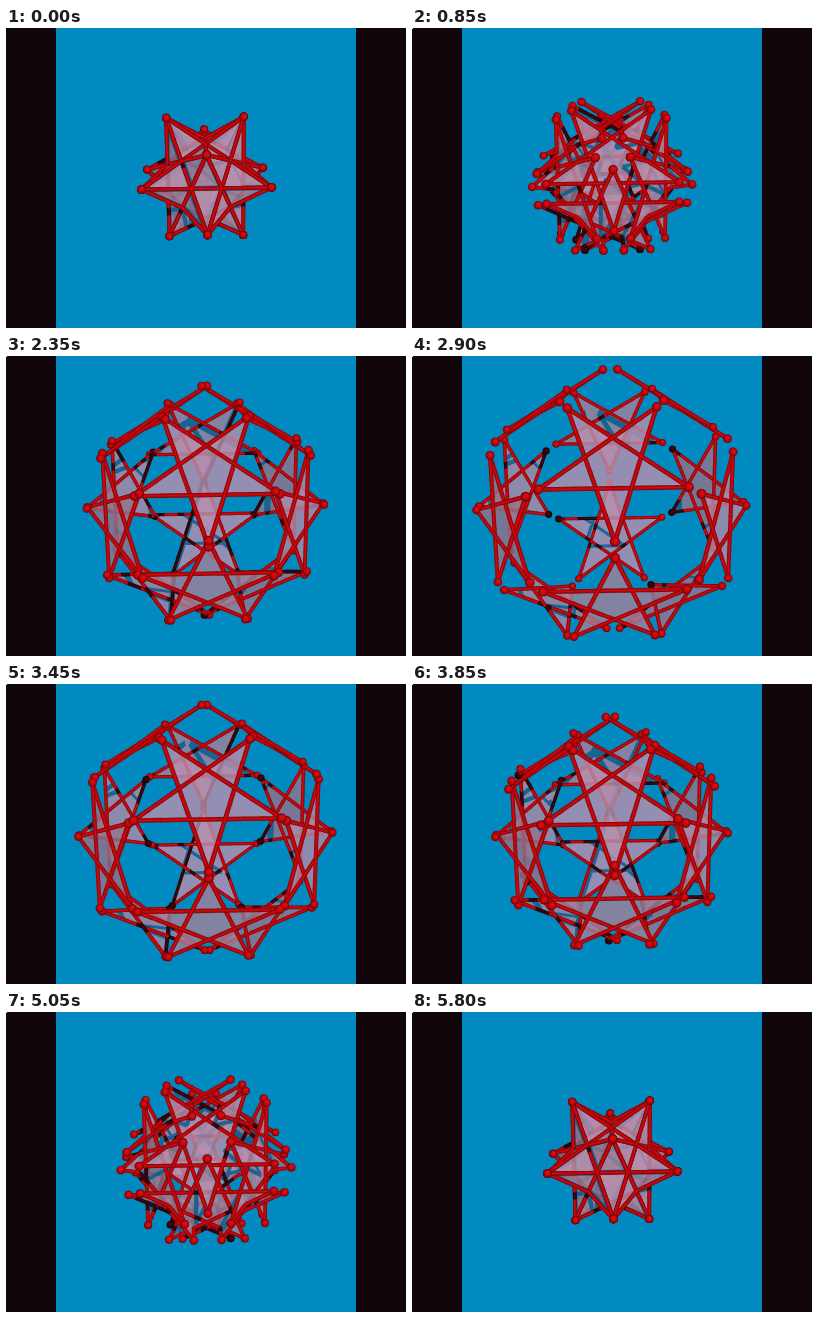
Animation, 400 px wide and 300 px high, one loop 6.1 s. Source, as an HTML page with a canvas:

```html
<!DOCTYPE html>
<html lang="en">
<head>
<meta charset="utf-8">
<title>Exploding stellated dodecahedron</title>
<style>
  html, body { margin: 0; width: 100%; height: 100%; overflow: hidden; background: #12060d; }
  canvas { display: block; }
</style>
</head>
<body>
<canvas id="stage" width="400" height="300"></canvas>
<script>
const ctx = document.getElementById('stage').getContext('2d');

const SCALE = 72, CAMERA = 8.8, TILT = 0.289, YAW = 0.016, ROLL = 0.016;
const ROD_RADIUS = 0.026, BALL_RADIUS = 0.057, ROD_PARTS = 16;
const PLANE = 1 / Math.sqrt(5);           // distance of a star's plane when closed
const STAR_RADIUS = 2 * PLANE;
const EDGE = STAR_RADIUS * Math.cos(Math.PI * 0.4);   // distance of a rod from the star's center
const EPS = 1e-6;

const add = (a, b, k = 1) => a.map((v, i) => v + k * b[i]);
const mul = (a, k) => a.map(v => v * k);
const dot = (a, b) => a[0] * b[0] + a[1] * b[1] + a[2] * b[2];
const cross = (a, b) => [a[1] * b[2] - a[2] * b[1], a[2] * b[0] - a[0] * b[2], a[0] * b[1] - a[1] * b[0]];
const mix = (a, b, k) => add(mul(a, 1 - k), b, k);
const unit = a => mul(a, 1 / Math.hypot(...a));
const turn = (a, b, angle) => {
  const c = Math.cos(angle), s = Math.sin(angle);
  return [a * c + b * s, b * c - a * s];
};

const LIGHT = unit([0.2, 0.26, 0.95]);

function orient([x, y, z]) {
  [y, z] = turn(y, z, TILT);
  [x, z] = turn(x, z, YAW);
  [y, x] = turn(y, x, ROLL);
  return [x, y, z];
}

// The twelve axes point at the corners of an icosahedron.
const axes = [[0, 0, 1]];
for (let k = 0; k < 5; k++) {
  const angle = Math.PI + k * Math.PI * 0.4;
  axes.push([STAR_RADIUS * Math.sin(angle), STAR_RADIUS * Math.cos(angle), PLANE]);
}
axes.push(...axes.map(a => mul(a, -1)));
axes.forEach((a, i) => axes[i] = orient(a));

// Five tips of each star, counterclockwise around its axis.
const tipsOf = axes.map(axis => {
  const near = axes.filter(b => dot(axis, b) > 0.3 && dot(axis, b) < 0.9);
  const u = add(near[0], axis, -PLANE), v = cross(axis, u);
  const angle = p => Math.atan2(dot(p, v), dot(p, u));
  return near.sort((p, q) => angle(p) - angle(q));
});

function makeStar(normal, index, shift) {
  const height = PLANE + shift, center = mul(normal, height);
  const tips = tipsOf[index].map(p => add(p, normal, shift));
  const inner = tips.map((p, k) => mix(center, mix(p, tips[(k + 1) % 5], 0.5), 0.4721));
  const pieces = [inner, ...tips.map((p, k) => [inner[(k + 4) % 5], p, inner[k]])];
  const rods = tips.map((p, k) => [p, tips[(k + 2) % 5]]);
  return { normal, index, height, center, tips, pieces, rods, facing: dot(normal, LIGHT) };
}

const distance = (star, p) => dot(star.normal, p) - star.height;

// Cuts a point, segment or convex polygon: [above, below] the star's plane.
function split(points, star) {
  const d = points.map(p => distance(star, p));
  if (d.every(v => v >= -EPS)) return [points, []];
  if (d.every(v => v <= EPS)) return [[], points];
  const above = [], below = [];
  points.forEach((p, i) => {
    if (d[i] >= 0) above.push(p);
    if (d[i] <= 0) below.push(p);
    const j = (i + 1) % points.length;
    if (d[i] * d[j] < 0 && (points.length > 2 || i === 0)) {
      const cut = mix(p, points[j], d[i] / (d[i] - d[j]));
      above.push(cut);
      below.push(cut);
    }
  });
  return [above, below];
}

// Back-to-front order by splitting space at each star's plane in turn.
function sortByDepth(items, stars, level = 0) {
  if (level === stars.length || !items.length) return items;
  const star = stars[level], on = [], sides = [[], []];
  for (const item of items) {
    if (item.star === star) { on.push(item); continue; }
    split(item.points, star).forEach((points, side) => {
      if (points.length) sides[side].push({ ...item, points });
    });
  }
  if (distance(star, [0, 0, CAMERA]) < 0) sides.reverse();
  return [...sortByDepth(sides[1], stars, level + 1), ...on, ...sortByDepth(sides[0], stars, level + 1)];
}

const zoom = p => SCALE * CAMERA / (CAMERA - p[2]);
const project = p => [199.7 + zoom(p) * p[0], 150 - zoom(p) * p[1]];

function trace(path, points) {
  points.forEach((p, i) => path[i ? 'lineTo' : 'moveTo'](...project(p)));
  path.closePath();
}

// The faces let light through, so only rods cast shadows.
function shadowOn(star, stars) {
  const path = new Path2D();
  for (const other of stars) {
    if (other === star) continue;
    for (const rod of other.rods) {
      const [a, b] = split(rod, star)[star.facing > 0 ? 0 : 1];
      if (!b) continue;
      const side = mul(unit(cross(add(b, a, -1), LIGHT)), ROD_RADIUS);
      const ribbon = [add(a, side), add(a, side, -1), add(b, side, -1), add(b, side)];
      trace(path, ribbon.map(p => add(p, LIGHT, -distance(star, p) / star.facing)));
    }
  }
  return path;
}

function inShadow(p, own, stars) {
  return stars.some(star => {
    if (star === own) return false;
    const reach = -distance(star, p) / star.facing;
    if (reach < 0.1) return false;
    const w = add(add(p, LIGHT, reach), star.center, -1);
    return Math.hypot(...w) < STAR_RADIUS && tipsOf[star.index].some(
      tip => Math.abs(dot(w, tip) / STAR_RADIUS - EDGE) < 1.4 * ROD_RADIUS);
  });
}

function drawFace({ points, star }) {
  const shade = star.lit ? Math.min(1, 0.65 + 0.5 * Math.abs(star.facing)) : 0.4;
  const [r, g, b] = mul([185, 146, 175], shade);
  const path = new Path2D();
  trace(path, points);
  ctx.fillStyle = `rgba(${r},${g},${b},.8)`;
  ctx.fill(path);
  if (!star.lit) return;
  ctx.save();
  ctx.clip(path);
  ctx.fillStyle = 'rgba(0,95,145,.82)';
  ctx.fill(star.shadow);
  ctx.restore();
}

function drawRod({ points, dark }) {
  const [x0, y0] = project(points[0]), [x1, y1] = project(points[1]);
  const length = Math.hypot(x1 - x0, y1 - y0);
  if (length < 0.01) return;
  const dx = (x1 - x0) / length, dy = (y1 - y0) / length;
  const half = ROD_RADIUS * zoom(mix(points[0], points[1], 0.5));
  const paint = ctx.createLinearGradient(x0 - dy * half, y0 + dx * half, x0 + dy * half, y0 - dx * half);
  paint.addColorStop(0, dark ? '#1c0206' : '#7c0308');
  paint.addColorStop(0.5, dark ? '#42050a' : '#d8080c');
  paint.addColorStop(1, dark ? '#1c0206' : '#7c0308');
  ctx.strokeStyle = paint;
  ctx.lineWidth = 2 * half;
  ctx.beginPath();
  ctx.moveTo(x0 - dx * 0.4, y0 - dy * 0.4);
  ctx.lineTo(x1 + dx * 0.4, y1 + dy * 0.4);
  ctx.stroke();
}

function drawBall({ points, dark }) {
  const [x, y] = project(points[0]), r = BALL_RADIUS * zoom(points[0]);
  const paint = ctx.createRadialGradient(x + r * 0.2, y - r * 0.25, 0, x, y, r);
  paint.addColorStop(0, dark ? '#4a060b' : '#e01014');
  paint.addColorStop(0.55, dark ? '#38040a' : '#c4080c');
  paint.addColorStop(1, dark ? '#180206' : '#690208');
  ctx.fillStyle = paint;
  ctx.beginPath();
  ctx.arc(x, y, r, 0, 2 * Math.PI);
  ctx.fill();
}

function drawSolid(shift) {
  const stars = axes.map((axis, i) => makeStar(axis, i, shift));
  const items = [];
  for (const star of stars) {
    star.lit = star.facing * distance(star, [0, 0, CAMERA]) > 0;
    if (star.lit) star.shadow = shadowOn(star, stars);
    for (const points of star.pieces) items.push({ draw: drawFace, star, points });
    for (const [from, to] of star.rods) {
      for (let i = 0; i < ROD_PARTS; i++) {
        const points = [mix(from, to, i / ROD_PARTS), mix(from, to, (i + 1) / ROD_PARTS)];
        const dark = inShadow(mix(points[0], points[1], 0.5), star, stars);
        items.push({ draw: drawRod, star, points, dark });
      }
    }
    for (const tip of star.tips) {
      items.push({ draw: drawBall, star, points: [tip], dark: inShadow(tip, star, stars) });
    }
  }
  for (const item of sortByDepth(items, stars)) item.draw(item);
}

function drawStage(tick) {
  ctx.fillStyle = '#12060d';
  ctx.fillRect(0, 0, 400, 300);
  ctx.fillStyle = '#008ac0';
  ctx.fillRect(50, 0, 300, 300);
  if (tick > 0) {
    ctx.fillStyle = '#fff';
    ctx.fillRect(0, 0, 1, 1);
  }
  const step = Math.max(0, tick - 6);
  drawSolid(1.25 * (1 - Math.abs(step - 55) / 55));
}

const start = performance.now();
let shown = -1;
function animate() {
  const tick = Math.min(116, Math.floor((performance.now() - start) % 6100 / 50));
  if (tick !== shown) drawStage(shown = tick);
  requestAnimationFrame(animate);
}
animate();
</script>
</body>
</html>
```
